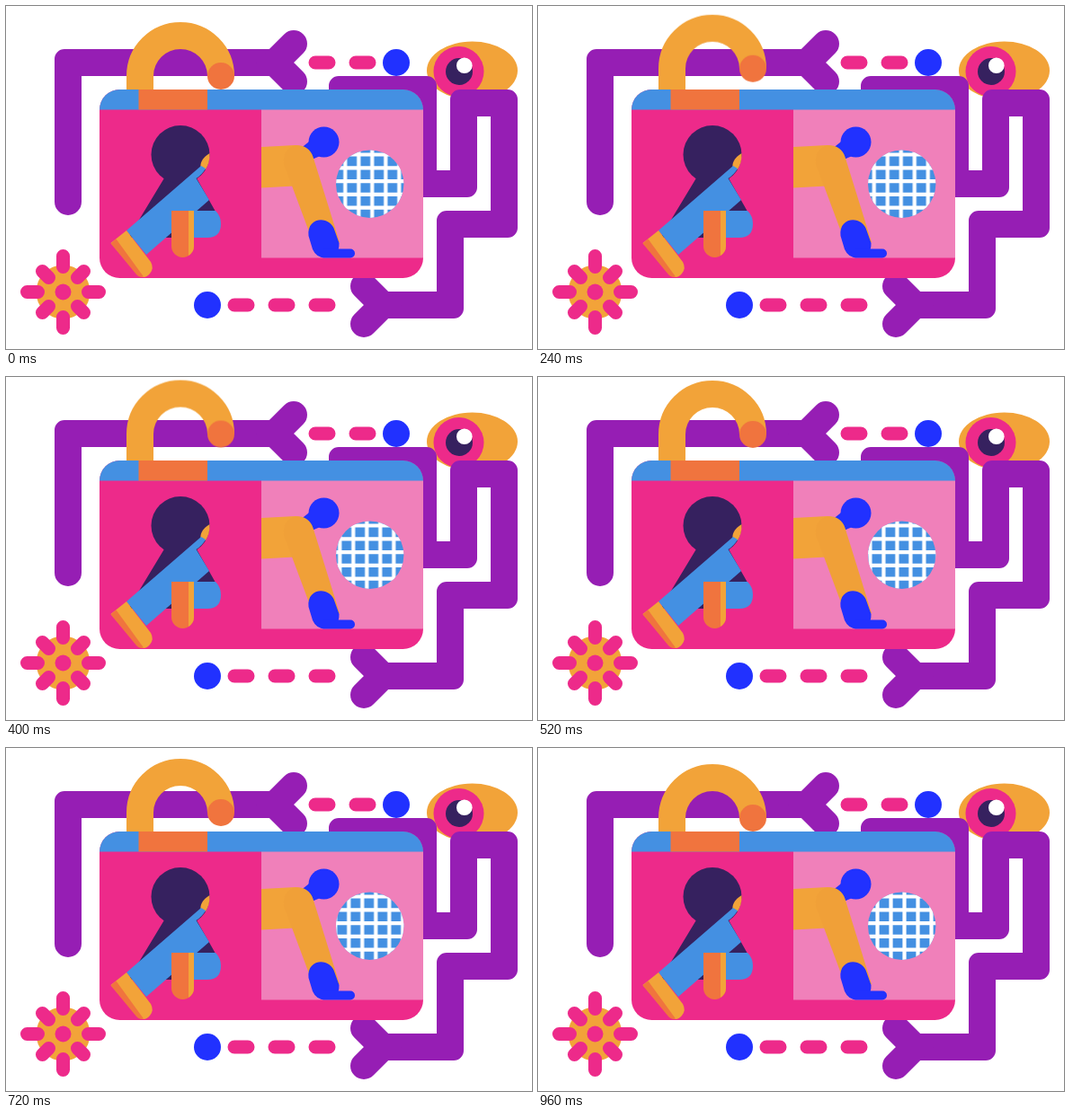
Recreate the animation shown at these times as an HTML page. Size 585 by 382 pixels, loop 1000 ms.

```html
<!DOCTYPE html>
<html lang="en">
<head>
<meta charset="utf-8">
<title>Padlock</title>
<style>
  html, body { margin: 0; width: 100%; height: 100%; overflow: hidden; background: #fff; }
  svg { display: block; width: 100vw; height: 100vh; }
  .purple { fill: #961eb4; }
  .pink { fill: #ed2a8a; }
  .rose { fill: #f080ba; }
  .orange { fill: #f2a339; }
  .rust { fill: #f0743e; }
  .sky { fill: #4490e2; }
  .blue { fill: #2131ff; }
  .dark { fill: #36215f; }
  .line { fill: none; stroke-linecap: round; }
  .fork { stroke: #961eb4; stroke-width: 30; }
  .dash { stroke: #ed2a8a; stroke-width: 15; }
  .shackle { animation: lift 1s cubic-bezier(.333, 0, .667, 1) infinite; }
  .bars { animation: spin 1s linear infinite; }
  @keyframes lift {
    0%, 93%, 100% { transform: translateY(0); }
    45% { transform: translateY(-15px); }
  }
  @keyframes spin {
    0% { transform: translateX(0); }
    96%, 100% { transform: translateX(-15px); }
  }
</style>
</head>
<body>
<svg viewBox="0 0 585 382">
  <defs>
    <clipPath id="body"><rect x="104" y="93" width="360" height="210" rx="22.5"/></clipPath>
    <clipPath id="ball"><circle cx="404.7" cy="198.2" r="37.7"/></clipPath>
    <g id="petals">
      <path d="M63.5 278.5v12M63.5 346.5v12"/>
      <path d="M40.5 295.5l7 7M79.5 334.5l7 7"/>
    </g>
  </defs>

  <!-- eye -->
  <ellipse class="orange" cx="518.5" cy="72" rx="50.5" ry="32.5"/>
  <circle class="pink" cx="503.5" cy="73" r="28"/>
  <circle class="dark" cx="504" cy="73" r="15"/>
  <circle cx="509.8" cy="66.2" r="8.8" fill="#fff"/>

  <!-- pipes -->
  <path class="purple" d="M54 218V59a11 11 0 0 1 11-11H299V78H84V218a15 15 0 0 1-30 0Z"/>
  <path class="line fork" d="M320 42L299 63L320 84"/>
  <path class="purple" d="M419 318H479V239a11 11 0 0 1 11-11H539V123H524V202a11 11 0 0 1-11 11H449V108H359V89a11 11 0 0 1 11-11H468a11 11 0 0 1 11 11V183H494V104a11 11 0 0 1 11-11H558a11 11 0 0 1 11 11V247a11 11 0 0 1-11 11H509V337a11 11 0 0 1-11 11H419Z"/>
  <path class="line fork" d="M398 312L419 333L398 354"/>

  <!-- dashes and dots -->
  <path class="line dash" d="M344 63h15M389 63h15M254 333h15M299 333h15M344 333h15"/>
  <circle class="blue" cx="434" cy="63" r="15"/>
  <circle class="blue" cx="224" cy="333" r="15"/>

  <!-- flower -->
  <circle class="orange" cx="63.5" cy="318.5" r="30"/>
  <circle class="pink" cx="63.5" cy="318.5" r="9"/>
  <g class="line" stroke="#ed2a8a" stroke-width="15">
    <use href="#petals"/>
    <use href="#petals" transform="rotate(90 63.5 318.5)"/>
  </g>

  <g class="shackle">
    <path d="M149 120V78a45 45 0 0 1 90 0" fill="none" stroke="#f2a339" stroke-width="30"/>
    <circle class="rust" cx="239" cy="78" r="15"/>
  </g>

  <g clip-path="url(#body)">
    <path class="pink" d="M104 93h360v210h-360z"/>
    <path class="rose" d="M284 115h180v165.5h-180z"/>
    <path class="sky" d="M104 93h360v22.5h-360z"/>
    <path class="rust" d="M147.500 93h76.500v22.500h-76.500z"/>
  </g>

  <!-- left figure -->
  <path class="dark" d="M177 190H211L232.500 228H209V258H136Z"/>
  <circle class="dark" cx="194" cy="165.500" r="32.500"/>
  <path class="orange" d="M226.500 164C218 169 215 176 217 181L222 182Q227 174 226.500 164Z"/>
  <path class="sky" d="M134 250L217 178L222 181Q218 188 211.500 192L226 216L156 277Z"/>
  <path class="sky" d="M209 228H233Q239 234 239 242.500Q239 258 224 258H209Z"/>
  <path class="orange" d="M134 250L161 285Q165 292 160 298Q155 304 149 301L116.500 264Z"/>
  <path class="rust" d="M122.500 259.500L153 301.500Q148 303 145 299L116.500 264.500Z"/>
  <path class="rust" d="M184 228H209V267.500a12.500 12.500 0 0 1-25 0Z"/>
  <path class="orange" d="M203 228H209V267.500Q209 274 203 278Z"/>

  <!-- right figure -->
  <path class="blue" d="M326 160L342 147L352 166L335 173Z"/>
  <circle class="blue" cx="353.500" cy="151.500" r="17"/>
  <path class="orange" d="M284 157L322 155Q336 156 341 170L330 200L284 202.500Z"/>
  <path fill="#f0a038" d="M309 176C307 150 336 150 341.500 168L371 263L341 262Z"/>
  <path class="blue" d="M336.500 256C334 234 361 233 365.500 250L370.500 264Q371 280 354 280Q345 280 341 271Z"/>
  <rect class="blue" x="348" y="270.500" width="40" height="10" rx="5"/>

  <!-- ball -->
  <g clip-path="url(#ball)">
    <path class="sky" d="M360 155h90v86h-90z"/>
    <g fill="none" stroke="#fff" stroke-width="4.200">
      <path d="M360 165.500h90m-90 14.800h90m-90 14.800h90m-90 14.800h90m-90 14.800h90"/>
      <path class="bars" d="M377.500 155v86m15-86v86m15-86v86m15-86v86m15-86v86m15-86v86"/>
    </g>
  </g>
</svg>
</body>
</html>
```
